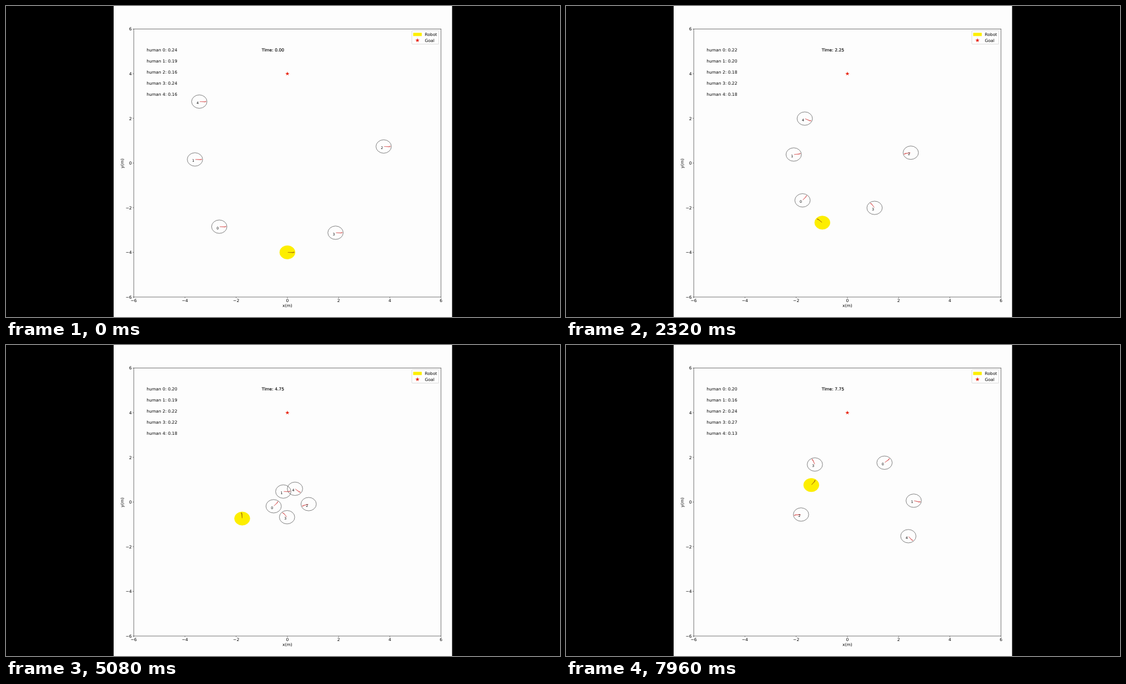
These frames come from a looping animation (998x561 px, 8 s). An HTML page:

```html
<!DOCTYPE html>
<html lang="en">
<head>
<meta charset="utf-8">
<title>Robot among moving humans</title>
<style>
  html, body { margin: 0; width: 100%; height: 100%; overflow: hidden; background: #000; }
  svg { display: block; width: 100%; height: 100%; }
  text { font-family: "DejaVu Sans", sans-serif; font-size: 7.55px; fill: #000; white-space: pre; }
  .clock { stroke: #000; stroke-width: .15; }
  .id { font-size: 6.2px; }
  .axis { fill: none; stroke: #505050; stroke-width: .8; }
  .ring { fill: none; stroke: #555; stroke-width: .75; }
  .robot { fill: #fdee00; stroke: #fdee00; stroke-width: .7; }
  .star { fill: #e8200c; }
  .arrow { fill: #d65050; stroke: #d65050; stroke-width: .5; }
  .robot + .arrow { fill: #9a5a10; stroke: #9a5a10; }
</style>
</head>
<body>
<svg id="stage" viewBox="0 0 998 561"></svg>
<script>
const LOOP = 8000, STEP_MS = 255;
const SIM_STEP = 0.25; // simulated seconds per step
const CENTER = { x: 506.9, y: 283.25 }, UNIT = { x: 46.13, y: 40.29 };
const RADIUS = { x: 0.3 * UNIT.x, y: 0.3 * UNIT.y };

// Waypoints in metres; each agent walks straight from one to the next.
const WALK_STEPS = [0, 11, 23, 31], SCORE_STEPS = [0, 16, 26, 31];
const HUMANS = [
  { path: [[-2.66, -2.85], [-1.55, -1.41], [-0.03, 0.42], [1.45, 1.76]], scores: [24, 21, 18, 20] },
  { path: [[-3.61, 0.16], [-1.76, 0.43], [0.64, 0.49], [2.59, 0.06]], scores: [19, 20, 16, 16] },
  { path: [[3.76, 0.74], [2.19, 0.4], [0.15, -0.34], [-1.81, -0.56]], scores: [16, 19, 28, 24] },
  { path: [[1.88, -3.12], [0.88, -1.76], [-0.46, -0.14], [-1.27, 1.68]], scores: [24, 21, 23, 27] },
  { path: [[-3.44, 2.75], [-1.27, 1.82], [1.08, -0.02], [2.38, -1.53]], scores: [16, 19, 14, 13] }
];
const ROBOT_STEPS = [0, 5, 10, 11, 16, 22, 23, 25, 26, 31];
const ROBOT_PATH = [[0, -4], [-0.65, -2.95], [-1.06, -2.6], [-0.89, -2.42], [-1.69, -1.48],
  [-1.84, 0], [-1.91, -0.12], [-2.03, -0.15], [-1.92, 0.07], [-1.41, 0.76]];

const stage = document.getElementById("stage");
const toX = x => CENTER.x + x * UNIT.x;
const toY = y => CENTER.y - y * UNIT.y;

function add(tag, attrs, parent = stage) {
  const node = document.createElementNS("http://www.w3.org/2000/svg", tag);
  for (const key in attrs) node.setAttribute(key, attrs[key]);
  return parent.appendChild(node);
}

function label(content, x, y, anchor = "start", extra = {}) {
  const node = add("text", { x, y, "text-anchor": anchor, ...extra });
  node.textContent = content;
  return node;
}

function star(x, y, r) {
  const points = Array.from({ length: 10 }, (_, i) => {
    const reach = i % 2 ? r * 0.382 : r, a = i * Math.PI / 5;
    return `${x + reach * Math.sin(a)},${y - reach * Math.cos(a)}`;
  });
  add("polygon", { class: "star", points: points.join(" ") });
}

function interpolate(keys, values, at) {
  let i = 1;
  while (i < keys.length - 1 && keys[i] < at) i++;
  const part = (at - keys[i - 1]) / (keys[i] - keys[i - 1]);
  return values[i - 1] + (values[i] - values[i - 1]) * part;
}

function along(steps, path, at) {
  return [0, 1].map(axis => interpolate(steps, path.map(p => p[axis]), at));
}

function drawPlot() {
  const left = toX(-6), bottom = toY(-6);
  add("rect", { width: 998, height: 561, fill: "#000" });
  add("rect", { x: 193.9, width: 609.7, height: 561, fill: "#fdfdfd" });
  add("rect", { class: "axis", x: left, y: toY(6), width: 12 * UNIT.x, height: 12 * UNIT.y });
  for (let v = -6; v <= 6; v += 2) {
    const name = v < 0 ? "\u2212" + -v : String(v);
    add("path", { class: "axis", d: `M${toX(v)} ${bottom}v1.8M${left} ${toY(v)}h-1.8` });
    label(name, toX(v), 534.3, "middle");
    label(name, 226.6, toY(v) + 2.9, "end");
  }
  label("x(m)", CENTER.x, 542.6, "middle");
  label("y(m)", 0, 0, "middle", { transform: `translate(212.4 ${CENTER.y + 0.6}) rotate(-90)` });
}

function drawLegend() {
  add("rect", { x: 731, y: 44.4, width: 48.8, height: 24.4, rx: 1.5,
    fill: "#fdfdfd", stroke: "#ccc", "stroke-width": 0.7 });
  add("rect", { class: "robot", x: 733.9, y: 48.8, width: 14.8, height: 5.1 });
  label("Robot", 754.6, 54);
  star(741.2, 62, 4);
  label("Goal", 754.6, 64.8);
}

function makeAgent(className, id = "") {
  const group = add("g", {});
  add("ellipse", { class: className, rx: RADIUS.x, ry: RADIUS.y }, group);
  const arrow = add("path", { class: "arrow" }, group);
  add("text", { class: "id", x: -5, y: 4.6 }, group).textContent = id;
  return { group, arrow };
}

// The arrow points the way the agent walks; lead looks ahead to round off turns.
function poseAgent({ group, arrow }, steps, path, k, lead) {
  const [x, y] = along(steps, path, k);
  const from = along(steps, path, k - 1), to = along(steps, path, k + lead);
  const heading = k ? Math.atan2(to[1] - from[1], to[0] - from[0]) : 0;
  const tipX = RADIUS.x * Math.cos(heading), tipY = -RADIUS.y * Math.sin(heading);
  const turn = Math.atan2(tipY, tipX) * 180 / Math.PI;
  group.setAttribute("transform", `translate(${toX(x)} ${toY(y)})`);
  arrow.setAttribute("transform", `rotate(${turn})`);
  arrow.setAttribute("d", `M.8 0H${Math.hypot(tipX, tipY) - 1}l-2 -.8v1.6z`);
}

drawPlot();
star(CENTER.x, toY(4), 3.9);
const robot = makeAgent("robot");
const humans = HUMANS.map((_, i) => makeAgent("ring", i));
const scores = HUMANS.map((_, i) => label("", toX(-5.5), toY(5 - i / 2)));
const clock = label("", toX(-1), toY(5), "start", { class: "clock" });
drawLegend();

function showStep(k) {
  poseAgent(robot, ROBOT_STEPS, ROBOT_PATH, k, 0);
  HUMANS.forEach((human, i) => {
    poseAgent(humans[i], WALK_STEPS, human.path, k, 1);
    const score = Math.round(interpolate(SCORE_STEPS, human.scores, k)) / 100;
    scores[i].textContent = `human ${i}: ${score.toFixed(2)}`;
  });
  clock.textContent = `Time: ${(k * SIM_STEP).toFixed(2)}`;
}

const start = performance.now();
let shown = -1;
function tick() {
  const t = (performance.now() - start) % LOOP;
  const k = Math.max(0, Math.floor((t - 4) / STEP_MS));
  if (k !== shown) showStep(shown = k);
  requestAnimationFrame(tick);
}
tick();
</script>
</body>
</html>
```
